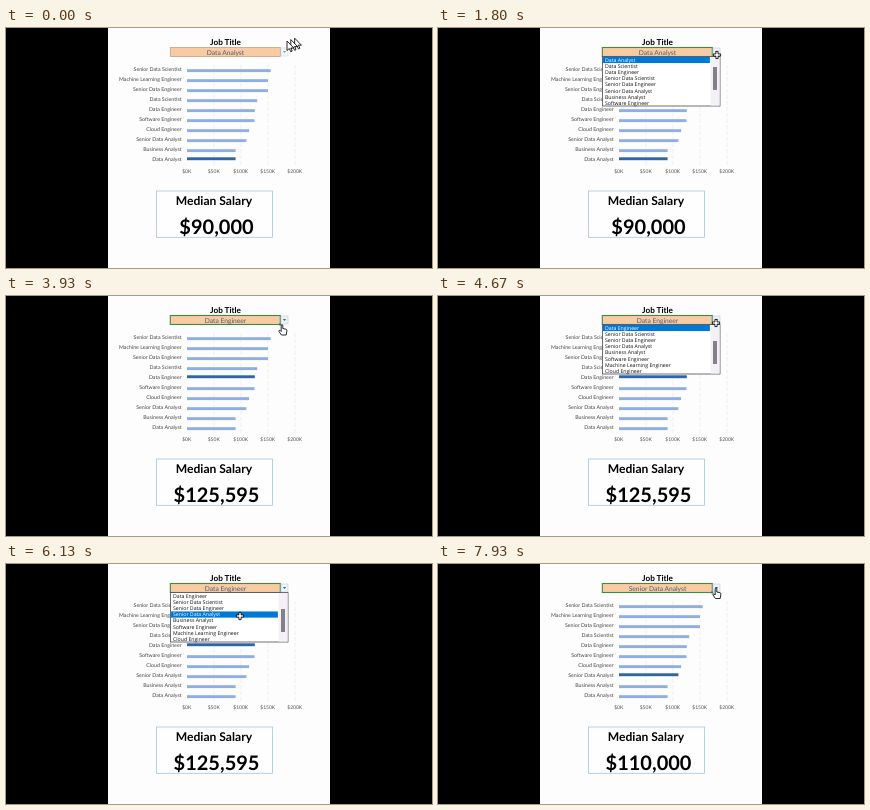
Write an HTML page that moves like this. It is 426x240 px and loops after 8000 ms.

```html
<!DOCTYPE html>
<html lang="en">
<head>
<meta charset="utf-8">
<title>Median salary by job title</title>
<style>
  html, body { margin: 0; width: 100%; height: 100%; overflow: hidden; background: #000; }
  svg { display: block; width: 100vw; height: 100vh; }
  text { font-family: Lato, "Open Sans", sans-serif; text-rendering: geometricPrecision; }
  .list text { font-family: "Open Sans", "Noto Sans", sans-serif; }
</style>
</head>
<body>
<svg id="stage" viewBox="0 0 426 240"></svg>
<script>
const LOOP = 8000, STEP = 1000 / 15;
const ROW = 6.18, LIST_TOP = 28.9;
const stage = document.getElementById('stage');

const pay = {
  'Senior Data Scientist': 155000,
  'Machine Learning Engineer': 150000,
  'Senior Data Engineer': 150000,
  'Data Scientist': 130000,
  'Data Engineer': 125595,
  'Software Engineer': 125000,
  'Cloud Engineer': 115000,
  'Senior Data Analyst': 110000,
  'Business Analyst': 90000,
  'Data Analyst': 90000
};
const jobs = Object.keys(pay);
const options = ['Data Analyst', 'Data Scientist', 'Data Engineer', 'Senior Data Scientist',
  'Senior Data Engineer', 'Senior Data Analyst', 'Business Analyst', 'Software Engineer',
  'Machine Learning Engineer', 'Cloud Engineer'];

// When each title takes effect, and when the list is open
const picks = [[0, 'Data Analyst'], [3200, 'Data Engineer'], [7000, 'Senior Data Analyst']];
const menus = [{ from: 1530, to: 3130, first: 0 }, { from: 4400, to: 6860, first: 2 }];

// Pointer: time, x, y, shape used from that time on
const path = [
  [-70, 289, 10, 'arrow'], [0, 281, 13, 'arrow'], [330, 277, 23, 'hand'],
  [1530, 279, 27, 'cross'], [1930, 279, 27, 'cross'], [2730, 240, 46.8, 'cross'],
  [3200, 240, 46.8, 'cross'], [3730, 276, 28.5, 'hand'], [4200, 276, 28.5, 'hand'],
  [4400, 278, 27, 'cross'], [4730, 278, 27, 'cross'], [5200, 246, 42.5, 'cross'],
  [5333, 236, 49, 'cross'], [5530, 234, 52, 'cross'], [7130, 234, 52, 'cross'],
  [7730, 278, 24, 'hand'], [8000, 278, 24, 'hand']
];

function add(parent, tag, attrs, content) {
  const node = document.createElementNS('http://www.w3.org/2000/svg', tag);
  for (const key in attrs) node.setAttribute(key, attrs[key]);
  if (content !== undefined) node.textContent = content;
  parent.appendChild(node);
  return node;
}
const set = (node, attrs) => { for (const key in attrs) node.setAttribute(key, attrs[key]); };
const rect = (parent, x, y, width, height, attrs) =>
  add(parent, 'rect', { x, y, width, height, ...attrs });
const text = (parent, x, y, size, fill, content, attrs) =>
  add(parent, 'text', { x, y, 'font-size': size, fill, 'text-anchor': 'middle', ...attrs }, content);
const show = (node, on) => node.setAttribute('visibility', on ? 'visible' : 'hidden');
const bold = { 'font-weight': 700 };

rect(stage, 0, 0, 426, 240, { fill: '#000' });
rect(stage, 102, 0, 222, 240, { fill: '#fdfdfd' });

// Chart
for (let i = 0; i <= 4; i++) {
  const x = 181 + 27 * i;
  if (i) add(stage, 'path', { d: `M${x} 37V137`, stroke: '#e9e9e4', 'stroke-width': 0.7, 'stroke-dasharray': '4 2' });
  text(stage, x - 0.3, 145.4, 5, '#505050', `$${i * 50}K`);
}
const bars = jobs.map((job, i) => {
  const y = 41.2 + 10 * i;
  text(stage, 175.6, y + 1.6, 5.28, '#444', job, { 'text-anchor': 'end' });
  return rect(stage, 181, y, pay[job] * 0.00054, 2.9);
});

// Title cell with its drop-down button
text(stage, 219.5, 16.9, 8.2, '#000', 'Job Title', bold);
const cell = rect(stage, 164.3, 19.5, 110, 9, { fill: '#f8cba3' });
const cellText = text(stage, 219.5, 26.5, 6.7, '#4f5a72', '');
const handle = rect(stage, 273.2, 27.4, 2, 2, { fill: '#217346' });
const button = add(stage, 'g', {});
rect(button, 275, 20, 7, 8, { fill: '#edf3fa', stroke: '#bccbdc', 'stroke-width': 0.6 });
add(button, 'path', { d: 'M276.8 23h3.4l-1.7 2.1z', fill: '#566' });

// Salary card
rect(stage, 150.5, 163, 116, 46.3, { fill: '#fefefe', stroke: '#a6c6de', 'stroke-width': 0.8 });
text(stage, 207.9, 176.8, 12.1, '#000', 'Median Salary', bold);
const salary = text(stage, 210.5, 206, 20, '#000', '', bold);

// Drop-down list
const list = add(stage, 'g', { class: 'list' });
rect(list, 164.5, 28.6, 117.5, 49.4, { fill: '#fff', stroke: '#4c4a55', 'stroke-width': 0.8 });
rect(list, 272.6, 29, 9, 48.6, { fill: '#f3f1f5' });
const thumb = rect(list, 275, 39, 4, 23, { fill: '#85808a' });
const mark = rect(list, 164.9, LIST_TOP, 107, ROW, { fill: '#0078d7' });
const rows = Array.from({ length: 8 }, (_, i) =>
  text(list, 167, LIST_TOP + ROW * i + 4.8, 5.2, '#111', '', { 'text-anchor': 'start' }));

// Pointer shapes, origin at the hot spot
const shapes = {
  arrow: 'M0 0V9.5L2.3 7.5L3.8 10.8L5.2 10.1L3.8 7H6.8Z',
  cross: 'M-1.1 -3.6H1.1V-1.1H3.6V1.1H1.1V3.6H-1.1V1.1H-3.6V-1.1H-1.1Z',
  hand: 'M-0.8 0.6Q0 -0.6 0.8 0.6V4L4 4.7Q5 5 4.9 6.2L4.2 10.5H-0.6L-3.1 6.8Q-3 5.3 -1.8 6L-0.8 7Z'
};
const pointers = [1, 0.5, 0].map(lag => ({
  lag, node: add(stage, 'path', { fill: '#fff', stroke: '#111', 'stroke-width': 0.9 })
}));

function pointerAt(t) {
  let i = 0;
  while (i < path.length - 2 && t >= path[i + 1][0]) i++;
  const [t0, x0, y0, kind] = path[i], [t1, x1, y1] = path[i + 1];
  const k = Math.min(1, Math.max(0, (t - t0) / (t1 - t0)));
  const e = t1 - t0 > 300 ? k * k * (3 - 2 * k) : k;
  return { x: x0 + (x1 - x0) * e, y: y0 + (y1 - y0) * e, kind };
}

function render(ms) {
  const t = Math.floor((ms % LOOP) / STEP + 0.06) * STEP % LOOP;
  const job = picks.filter(p => p[0] <= t + 1).pop()[1];
  const menu = menus.find(m => t >= m.from && t < m.to);
  const p = pointerAt(t), last = pointerAt(t - STEP);

  bars.forEach((bar, i) => {
    const on = jobs[i] === job;
    set(bar, { fill: on ? '#2f66a8' : '#8faee3', y: 41.2 + 10 * i - (on ? 1.9 : 0) });
  });
  cellText.textContent = job;
  salary.textContent = '$' + pay[job].toLocaleString('en-US');

  const active = t >= 600;
  set(cell, { stroke: active ? '#3d8a45' : '#b59a80', 'stroke-width': active ? 1.1 : 0.7 });
  show(handle, active && !menu);
  button.setAttribute('opacity', active ? 1 : 0.6);

  list.setAttribute('display', menu ? 'inline' : 'none');
  if (menu) {
    const inside = p.x < 272 && p.y > LIST_TOP;
    const hover = inside ? Math.min(7, Math.floor((p.y - LIST_TOP) / ROW)) : options.indexOf(job) - menu.first;
    mark.setAttribute('y', LIST_TOP + ROW * hover);
    thumb.setAttribute('y', 39 + 3 * menu.first);
    rows.forEach((row, i) => {
      row.textContent = options[menu.first + i];
      row.setAttribute('fill', i === hover ? '#fff' : '#111');
    });
  }

  // A fast move leaves earlier poses behind
  const fast = Math.hypot(p.x - last.x, p.y - last.y) > 3;
  pointers.forEach(({ lag, node }) => {
    const pose = pointerAt(t - lag * STEP);
    show(node, fast || !lag);
    set(node, { d: shapes[pose.kind], transform: `translate(${pose.x} ${pose.y})` });
  });
}

const start = performance.now();
function tick() {
  render(performance.now() - start);
  requestAnimationFrame(tick);
}
tick();
</script>
</body>
</html>
```
